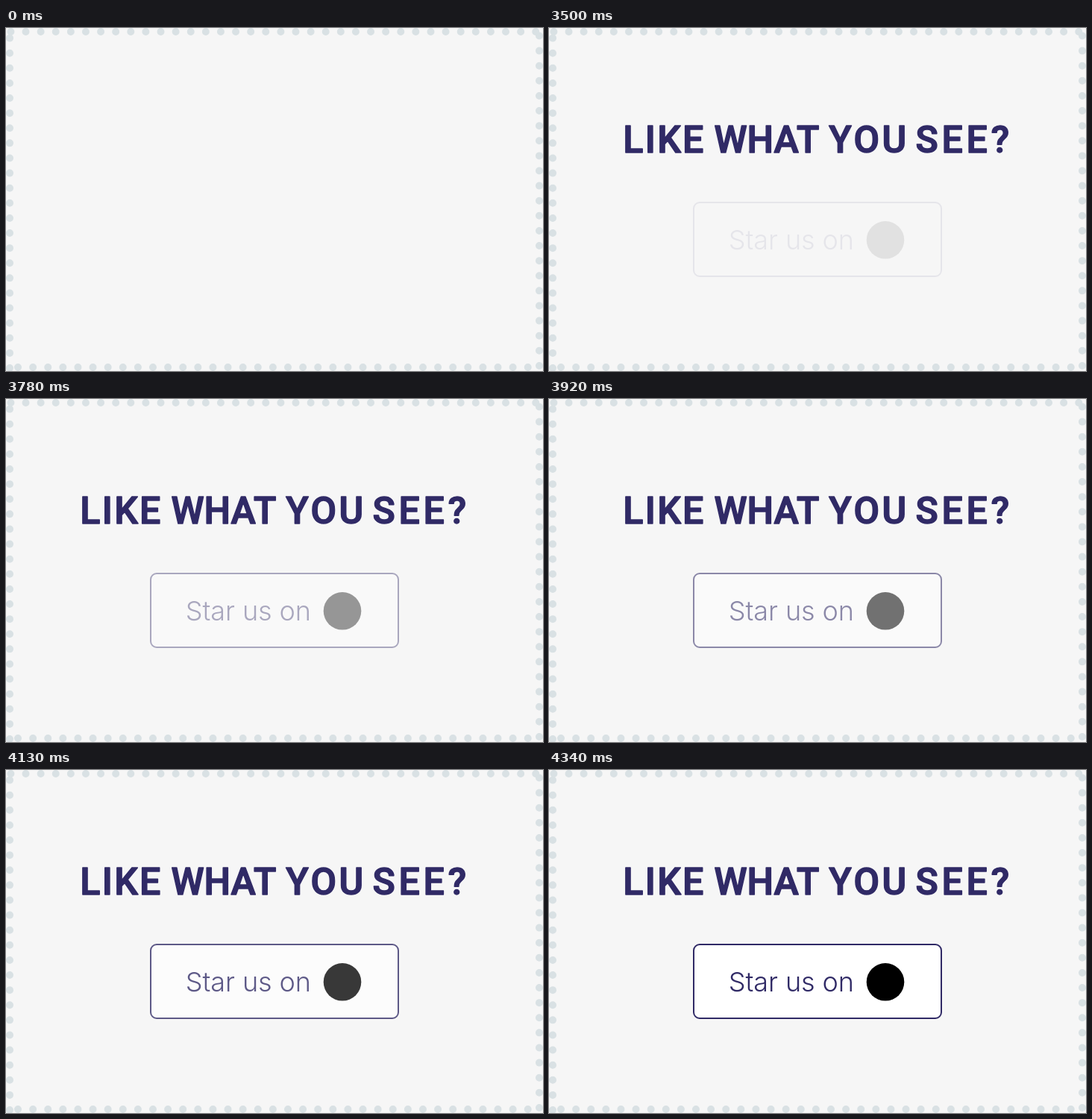
Recreate the animation shown at these times as an HTML page. Size 720 by 460 pixels, loop 9.34 s.

```html
<!DOCTYPE html>
<html lang="en">
<head>
<meta charset="utf-8">
<title>Like what you see?</title>
<style>
  html, body { margin: 0; width: 100%; height: 100%; overflow: hidden; background: #f6f6f6; }
  svg { display: block; width: 720px; height: 460px; }
  .dots { fill: none; stroke: #d9e1e4; stroke-width: 10; stroke-linecap: round; stroke-dasharray: 0 20.11; }
  #title { font: 500 50px Roboto, sans-serif; fill: #302a66; stroke: #302a66; stroke-width: 1.5; stroke-linejoin: round; }
  #button text { font: 300 36px Inter, sans-serif; font-optical-sizing: none; fill: #302a66; }
  #button rect { fill: #fff; stroke: #302a66; stroke-width: 2; }
</style>
</head>
<body>
<svg viewBox="0 0 720 460">
  <path class="dots" d="M6.4 5H712"/>
  <path class="dots" d="M715 10.5V454"/>
  <path class="dots" d="M16 455H702"/>
  <path class="dots" d="M5 13.6V458"/>
  <g id="title" visibility="hidden">
    <text x="99.2" y="166.5" letter-spacing="2.4">LIKE</text>
    <text x="221.6" y="166.5" letter-spacing="0">WHAT</text>
    <text x="375.3" y="166.5" letter-spacing="3.4">YOU</text>
    <text x="491.5" y="166.5" letter-spacing="4.8">SEE?</text>
  </g>
  <g id="button" opacity="0">
    <rect x="194" y="234" width="332" height="99" rx="8"/>
    <text x="240.8" y="297" letter-spacing="-.08">Star us on</text>
    <circle cx="451" cy="284.3" r="25.3"/>
  </g>
</svg>
<script>
  const LOOP = 9340, TITLE_AT = 2500, FADE_AT = 3500, STEP = 70, STEPS = 13;
  const title = document.getElementById('title');
  const button = document.getElementById('button');
  const start = performance.now();

  function draw() {
    const t = (performance.now() - start) % LOOP;
    const step = Math.floor((t - FADE_AT) / STEP) + 1;
    title.setAttribute('visibility', t >= TITLE_AT ? 'visible' : 'hidden');
    button.setAttribute('opacity', Math.min(Math.max(step / STEPS, 0), 1));
    requestAnimationFrame(draw);
  }
  draw();
</script>
</body>
</html>
```
